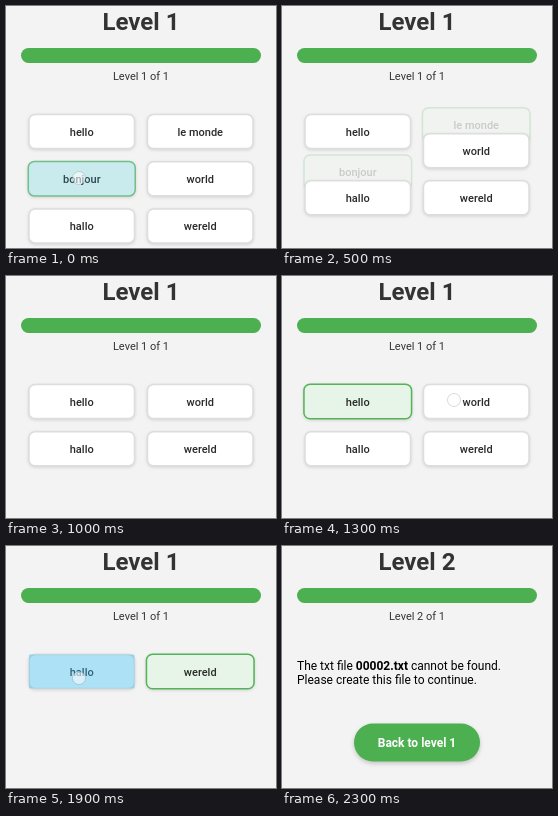
Recreate the animation shown at these times as an HTML page. Size 270x242 px, loop 2.9 s.

```html
<!DOCTYPE html>
<html lang="en">
<head>
<meta charset="utf-8">
<title>Word matching</title>
<style>
  html, body { margin: 0; height: 100%; overflow: hidden; background: #f3f3f3; }
  svg { display: block; font-family: Roboto, sans-serif; font-size: 11px; fill: #333; }
  .mid { text-anchor: middle; }
  .title { font-size: 24px; font-weight: 700; }
  .word { font-weight: 500; fill: #2b2b2b; text-anchor: middle; }
  .box { stroke-width: 1.5; filter: drop-shadow(0 1.5px 1.5px rgba(0, 0, 0, .13)); }
  .tap { fill: rgb(51, 181, 229); }
  .note { font-size: 12px; fill: #000; }
  .note .bold, .button text { font-weight: 700; }
  .button rect { fill: #4caf50; filter: drop-shadow(0 2px 2px rgba(0, 0, 0, .2)); }
  .button text { font-size: 12px; fill: #fff; text-anchor: middle; }
  #dot { fill: rgba(255, 255, 255, .55); stroke: rgba(120, 120, 120, .4); stroke-width: .7; }
</style>
</head>
<body>
<svg width="270" height="242" viewBox="0 0 270 242">
  <text class="mid title" id="title" x="135" y="24"></text>
  <rect x="15" y="42" width="240" height="15" rx="7.5" fill="#4caf50"/>
  <text class="mid" id="count" x="135" y="73.5"></text>
  <g id="cards"></g>
  <circle id="dot" r="6.5"/>
  <g id="end">
    <text class="note" x="15" y="123.5">The txt file <tspan class="bold">00002.txt</tspan> cannot be found.</text>
    <text class="note" x="15" y="137.5">Please create this file to continue.</text>
    <g class="button">
      <rect x="72" y="177.5" width="126" height="38" rx="19"/>
      <text x="135" y="200.5">Back to level 1</text>
    </g>
  </g>
</svg>
<script>
const LOOP = 2900, STEP = 100, LEVEL_END = 2300;
const ROW = 47.2, COL = 118.5;
const $ = id => document.getElementById(id);
const ramp = (t, a, b) => Math.min(1, Math.max(0, (t - a) / (b - a)));
const mix = (a, b, k) => `rgb(${a.map((v, i) => Math.round(v + (b[i] - v) * k))})`;

// Each card: word, column, row, tap time, fade start and end
const cards = [
  ['hello', 0, 0, 1100, 1400, 1500],
  ['bonjour', 0, 1, -100, 300, 550],
  ['hallo', 0, 2, 1900],
  ['le monde', 1, 0, 300, 300, 550],
  ['world', 1, 1, 1400, 1400, 1500],
  ['wereld', 1, 2, 1700],
].map(([word, col, row, tap, from, to]) => {
  const g = document.createElementNS('http://www.w3.org/2000/svg', 'g');
  const frame = 'x="-52.75" y="-17" width="105.5" height="34"';
  g.innerHTML = `<rect class="box" ${frame} rx="6"/>
    <text class="word" y="4">${word}</text><rect class="tap" ${frame}/>`;
  $('cards').append(g);
  const [box, , glow] = g.children;
  return { g, box, glow, col, row, tap, from, to };
});

// Finger positions: start, end, x, y
const touches = [
  [0, 100, 73, 172],
  [200, 400, 190, 124],
  [1100, 1200, 80, 126],
  [1300, 1500, 172, 124],
  [1700, 1800, 190, 126],
  [1900, 2000, 73, 132],
];

// Space freed by a removed card: its height shrinks, then the gap closes
function freed(card, t) {
  if (!card.to) return 0;
  if (card.to === 1500) return t >= 1500 ? ROW : 0;
  return t >= 900 ? ROW : 35 * ramp(t, 350, 537);
}

function drawCard(card, t) {
  const { g, box, glow, col, row, tap } = card;
  const picked = t < tap + 100 ? 0 : t < tap + 200 ? .7 : 1;
  const gone = card.to ? ramp(t, card.from, card.to) : 0;
  const lift = cards.filter(c => c.col === col && c.row < row)
    .reduce((sum, c) => sum + freed(c, t), 0);
  const x = 75.75 + col * COL, y = 125.5 + row * ROW - lift - 8 * gone;
  g.setAttribute('transform', `translate(${x} ${y})`);
  g.setAttribute('opacity', 1 - gone);
  const size = `scale(${1 + .02 * picked})`;
  for (const r of [box, glow]) r.setAttribute('transform', size);
  box.setAttribute('fill', mix([255, 255, 255], [230, 245, 231], picked));
  box.setAttribute('stroke', mix([221, 221, 221], [84, 180, 88], picked));
  glow.setAttribute('rx', picked ? 6 : 1);
  glow.setAttribute('opacity', t < tap ? 0 : .4 * (1 - ramp(t, tap, tap + 200)));
}

function draw(now) {
  const t = Math.floor(now % LOOP / STEP) * STEP;
  const done = t >= LEVEL_END, level = done ? 2 : 1;
  $('title').textContent = `Level ${level}`;
  $('count').textContent = `Level ${level} of 1`;
  $('cards').style.display = done ? 'none' : '';
  $('end').style.display = done ? '' : 'none';
  cards.forEach(c => drawCard(c, t));
  const touch = touches.find(([a, b]) => t >= a && t < b);
  $('dot').style.display = touch ? '' : 'none';
  if (touch) $('dot').setAttribute('transform', `translate(${touch[2]} ${touch[3]})`);
}

const start = performance.now();
function tick() {
  draw(performance.now() - start);
  requestAnimationFrame(tick);
}
tick();
</script>
</body>
</html>
```
